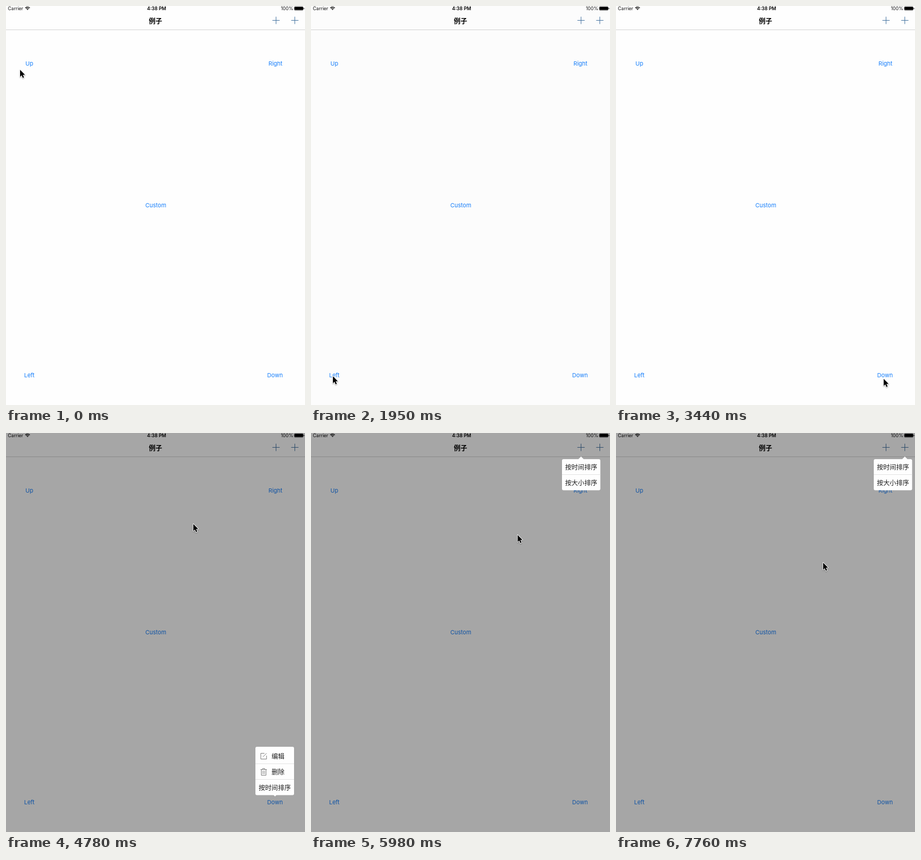
An HTML page with a canvas for the animation above (8 s loop, 573 px wide and 763 px high).

```html
<!DOCTYPE html>
<html lang="zh-CN">
<head>
<meta charset="utf-8">
<title>例子</title>
<style>
html, body { margin: 0; width: 100%; height: 100%; overflow: hidden; background: #fefefe; }
canvas { display: block; }
</style>
</head>
<body>
<canvas id="stage" width="573" height="763"></canvas>
<script>
const W = 573, H = 763, LOOP = 8000, FADE = 250;
const ctx = document.getElementById('stage').getContext('2d');
const LATIN = 'Inter, "Liberation Sans", sans-serif';
const HAN = '"Noto Sans CJK SC", "Noto Sans CJK JP", "Noto Sans CJK", sans-serif';
const BLUE = '#157efb';
const TIME = '按时间排序', SIZE = '按大小排序', EDIT = '编辑', REMOVE = '删除';

// Cursor tip: time, x, y
const path = [
  [0, 27, 122], [150, 37, 114], [300, 42, 111], [750, 43, 112],
  [1350, 95, 382], [1500, 95, 382], [1800, 42, 708], [2100, 42, 708],
  [2540, 504, 716], [2840, 513, 713], [3990, 513, 713],
  [4780, 359, 174], [4930, 359, 174], [5230, 517, 30], [5530, 517, 30],
  [5980, 396, 195], [6730, 396, 195], [7030, 553, 30], [7330, 553, 30],
  [7620, 397, 250], [7760, 397, 248], [8000, 397, 248]
];

// tip: arrow point and scaling anchor
const menus = [
  { open: 350, close: 1420, x: 8, y: 126, w: 73.5, h: 59.5, tip: [44.5, 121], side: 'top', rows: [TIME, SIZE] },
  { open: 1930, close: 2680, x: 61, y: 676, w: 74, h: 59.5, tip: [56, 705.7], side: 'left', rows: [EDIT, REMOVE], inset: 3 },
  { open: 3520, close: 4800, x: 478, y: 600, w: 74, h: 92.5, tip: [515.5, 695], side: 'bottom', rows: [EDIT, REMOVE, TIME], top: 3 },
  { open: 5260, close: 6590, x: 481, y: 50, w: 73.5, h: 59.5, tip: [517.5, 45], side: 'top', rows: [TIME, SIZE] },
  { open: 7050, close: 9000, x: 494, y: 50, w: 73.5, h: 59.5, tip: [553.5, 45], side: 'top', rows: [TIME, SIZE] }
];

const clamp = v => Math.max(0, Math.min(1, v));
const ease = v => v * v * (3 - 2 * v);

function snap(t) {
  if (t >= 7760) return 7760;
  if (t >= 7620) return 7620;
  if (t >= 6580) return 6580 + Math.floor((t - 6580) / 150) * 150;
  const m = t % 2240;
  return t - m + Math.floor(m / 150) * 150;
}

function text(str, x, y, font, color, align = 'left') {
  ctx.font = font;
  ctx.fillStyle = color;
  ctx.textAlign = align;
  ctx.fillText(str, x, y);
}

function line(points, color, width) {
  ctx.beginPath();
  points.forEach(([x, y], i) => i ? ctx.lineTo(x, y) : ctx.moveTo(x, y));
  ctx.strokeStyle = color;
  ctx.lineWidth = width;
  ctx.stroke();
}

function poly(points, color) {
  ctx.beginPath();
  points.forEach(([x, y]) => ctx.lineTo(x, y));
  ctx.closePath();
  ctx.fillStyle = color;
  ctx.fill();
}

function box(x, y, w, h, r, color) {
  ctx.beginPath();
  ctx.roundRect(x, y, w, h, r);
  ctx.fillStyle = color;
  ctx.fill();
}

function wifi(x, y) {
  ctx.strokeStyle = '#000';
  ctx.lineWidth = 1.3;
  for (const r of [3.7, 6]) {
    ctx.beginPath();
    ctx.arc(x, y, r, -Math.PI * 0.76, -Math.PI * 0.24);
    ctx.stroke();
  }
  ctx.beginPath();
  ctx.moveTo(x, y);
  ctx.arc(x, y, 2.2, -Math.PI * 0.76, -Math.PI * 0.24);
  ctx.fillStyle = '#000';
  ctx.fill();
}

function battery() {
  ctx.beginPath();
  ctx.roundRect(552.5, 1.5, 17, 6.5, 1.5);
  ctx.strokeStyle = '#222';
  ctx.lineWidth = 0.8;
  ctx.stroke();
  box(553.2, 2, 15.8, 5.6, 0.8, '#000');
  box(570.4, 3.5, 1.2, 2.6, 0.6, '#222');
}

function plus(x, y) {
  line([[x - 7, y], [x + 7, y]], '#42719f', 1);
  line([[x, y - 7], [x, y + 7]], '#42719f', 1);
}

function screen() {
  ctx.fillStyle = '#fefefe';
  ctx.fillRect(0, 0, W, H);
  ctx.fillStyle = '#d2d2d2';
  ctx.fillRect(0, 45, W, 1);
  text('Carrier', 3.5, 8, '9px ' + LATIN, '#111');
  wifi(41.3, 7.8);
  text('4:38 PM', 288.5, 8, '600 9px ' + LATIN, '#000', 'center');
  text('100%', 550.5, 8, '9px ' + LATIN, '#111', 'right');
  battery();
  text('例子', 286.5, 33.2, 'bold 12.7px ' + HAN, '#000', 'center');
  plus(517.5, 27.5);
  plus(553.5, 27.5);
  const button = '11px ' + LATIN;
  text('Up', 44.7, 114, button, BLUE, 'center');
  text('Right', 516.4, 114, button, BLUE, 'center');
  text('Custom', 287, 385, button, BLUE, 'center');
  text('Left', 44.7, 710, button, BLUE, 'center');
  text('Down', 515.5, 710, button, BLUE, 'center');
}

function pencil(x, y) {
  line([[x + 1.5, y - 5.5], [x - 5.5, y - 5.5], [x - 5.5, y + 5.5], [x + 5.5, y + 5.5], [x + 5.5, y - 1]], '#777', 1);
  line([[x - 1.5, y + 1.5], [x + 5.5, y - 5.5]], '#777', 1);
}

function trash(x, y) {
  line([[x - 6, y - 4.5], [x + 6, y - 4.5]], '#777', 1);
  line([[x - 2, y - 4.5], [x - 2, y - 6.5], [x + 2, y - 6.5], [x + 2, y - 4.5]], '#777', 0.9);
  line([[x - 4.5, y - 4.5], [x - 4.5, y + 6.5], [x + 4.5, y + 6.5], [x + 4.5, y - 4.5]], '#777', 1);
  for (const d of [-2, 0, 2]) line([[x + d, y - 2.2], [x + d, y + 4.3]], '#888', 0.8);
}

function arrow({ x, y, h, tip: [tx, ty], side }) {
  if (side === 'left') return poly([[tx, ty], [x + 0.5, ty - 5], [x + 0.5, ty + 5]], '#fefefe');
  const base = side === 'top' ? y + 0.5 : y + h - 0.5;
  const half = Math.abs(base - ty);
  poly([[tx, ty], [tx - half, base], [tx + half, base]], '#fefefe');
}

function drawMenu(m, k) {
  const { x, y, w, h, tip, rows, inset = 0, top = 0 } = m;
  const s = 0.1 + 0.9 * k;
  ctx.save();
  ctx.globalAlpha = k;
  ctx.translate(tip[0], tip[1]);
  ctx.scale(s, s);
  ctx.translate(-tip[0], -tip[1]);
  box(x, y, w, h, 3, '#fefefe');
  arrow(m);
  rows.forEach((label, i) => {
    const mid = y + top + 15 + i * 30;
    const font = '12.3px ' + HAN;
    if (i) {
      ctx.fillStyle = '#e2e2e2';
      ctx.fillRect(x + inset, Math.floor(mid - 15.5), w - 2 * inset, 1);
    }
    if (label.length > 2) {
      text(label, x + w / 2, mid + 4.6, font, '#1c1c1c', 'center');
    } else {
      (label === EDIT ? pencil : trash)(x + 15.8 + inset, mid);
      text(label, x + 31 + inset, mid + 4.6, font, '#1c1c1c');
    }
  });
  ctx.restore();
}

function cursor(t) {
  let i = 0;
  while (i < path.length - 2 && t >= path[i + 1][0]) i++;
  const [t0, x0, y0] = path[i], [t1, x1, y1] = path[i + 1];
  const k = ease(clamp((t - t0) / (t1 - t0)));
  ctx.save();
  ctx.translate(x0 + (x1 - x0) * k, y0 + (y1 - y0) * k);
  ctx.beginPath();
  [[0, 0], [0, 13.4], [3, 10.6], [5.2, 15.6], [7.5, 14.6], [5.3, 9.7], [9.4, 9.5]]
    .forEach(([x, y]) => ctx.lineTo(x, y));
  ctx.closePath();
  ctx.shadowColor = 'rgba(0,0,0,0.35)';
  ctx.shadowBlur = 2;
  ctx.shadowOffsetY = 1;
  ctx.strokeStyle = '#fff';
  ctx.lineWidth = 1.8;
  ctx.lineJoin = 'round';
  ctx.stroke();
  ctx.shadowColor = 'transparent';
  ctx.fillStyle = '#000';
  ctx.fill();
  ctx.restore();
}

function draw(t) {
  screen();
  for (const m of menus) {
    const k = ease(clamp((t - m.open) / FADE)) * (1 - ease(clamp((t - m.close) / FADE)));
    if (k <= 0) continue;
    ctx.fillStyle = `rgba(0,0,0,${0.35 * k})`;
    ctx.fillRect(0, 0, W, H);
    drawMenu(m, k);
  }
  cursor(t);
}

const start = performance.now();
function tick() {
  draw(snap((performance.now() - start) % LOOP));
  requestAnimationFrame(tick);
}
tick();
</script>
</body>
</html>
```
